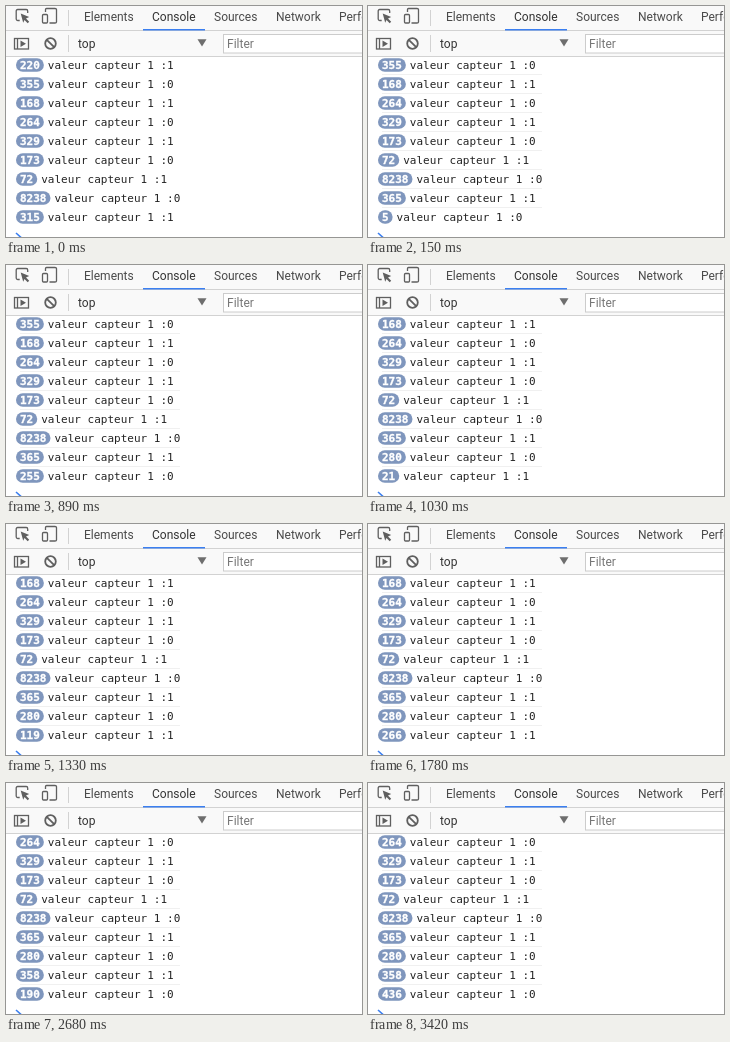
Animation, 356 px wide and 231 px high, one loop 3570 ms. Source, as an HTML page:

```html
<!DOCTYPE html>
<html lang="fr">
<head>
<meta charset="utf-8">
<title>Console</title>
<style>
  html, body { margin: 0; width: 100%; height: 100%; overflow: hidden; background: #fff; }
  svg { display: block; }
  text { white-space: pre; }
  .ui { font: 12px Roboto, sans-serif; fill: #4a4a4a; }
  .ui .active { fill: #333; }
  .ui .hint { fill: #777; }
  .log { font: 11px "DejaVu Sans Mono", monospace; fill: #222; }
  .count { font-weight: bold; fill: #fff; stroke: #fff; stroke-width: .35; }
  .icon { fill: none; stroke: #5f5f5f; stroke-width: 1.3; }
  .bold { stroke-width: 1.8; }
  .solid { fill: #5f5f5f; }
</style>
</head>
<body>
<svg width="356" height="231" viewBox="0 0 356 231">
  <rect width="356" height="50" fill="#f9f9f9"/>
  <path d="M0 24.5H356M0 50.5H356M62.5 4V20M62.5 29V46" stroke="#d2d2d2"/>

  <g transform="translate(.7 0)">
    <path class="icon" d="M13 14.5H11Q9.500 14.5 9.500 13V5Q9.500 3.500 11 3.500H19.500Q21 3.500 21 5V7"/>
    <path class="solid" d="M14 7.500L22.500 11L19.300 12.500L22.500 15.800L21 17.200L17.800 14L16.500 16.800Z"/>
  </g>
  <path class="icon" d="M39.500 6V3.500Q39.500 2.500 40.500 2.500H49Q50.500 2.500 50.500 3.500V16Q50.500 17 49 17H43.500"/>
  <rect class="icon" x="36.500" y="8.500" width="5" height="8.500" rx="1"/>

  <rect class="icon" x="8.500" y="32.500" width="14" height="10.500"/>
  <path class="icon" d="M11.500 32.500V43"/>
  <path class="solid" d="M14.500 34.500L20 37.700L14.500 41Z"/>
  <circle class="icon bold" cx="44.500" cy="37.500" r="5.300"/>
  <path class="icon bold" d="M40.800 33.800L48.200 41.200"/>
  <path d="M191.500 33.300H200.500L196 40.500Z" fill="#6e6e6e"/>
  <rect x="217.500" y="28.500" width="150" height="18.500" fill="#fff" stroke="#ccc"/>

  <g class="ui">
    <text x="78" y="15">Elements</text>
    <text class="active" x="146" y="15">Console</text>
    <text x="208" y="15">Sources</text>
    <text x="270" y="15">Network</text>
    <text x="333" y="15">Performance</text>
    <text class="active" x="72" y="42">top</text>
    <text class="hint" x="221" y="42">Filter</text>
  </g>
  <rect x="137" y="23" width="62" height="1.500" fill="#3b7ff0"/>

  <g id="rules" fill="#f0f0f0"></g>
  <g id="rows"></g>
  <path d="M10 227L14.500 231L10 235" fill="none" stroke="#3b7ff0" stroke-width="1.600"/>
</svg>
<script>
const LOOP = 3570, BEAT = 150, ROWS = 9, PITCH = 19, CHAR = 6.62;
const shortBeats = [1, 6, 18]; // these last 10 ms less
// Final repeat counts, oldest first; the sensor value alternates 1, 0.
const done = [220, 355, 168, 264, 329, 173, 72, 8238, 365, 280, 358];
// How the newest line counts up before the next one pushes it away.
const runs = [
  { from: 315, to: 315, beats: 1 },
  { from: 5, to: 255, beats: 6 },
  { from: 21, to: 315, beats: 7 },
  { from: 10, to: 436, beats: 10, ease: 1.062 }
];

const steps = runs.flatMap(({ from, to, beats, ease = 1 }, first) =>
  Array.from({ length: beats }, (_, n) => {
    const p = (n / Math.max(1, beats - 1)) ** ease;
    return { first, count: Math.round(from + (to - from) * p) };
  }));

const beatStart = k => k * BEAT - 10 * shortBeats.filter(b => b < k).length;

function add(parent, tag, attrs) {
  const el = document.createElementNS("http://www.w3.org/2000/svg", tag);
  for (const key in attrs) el.setAttribute(key, attrs[key]);
  return parent.appendChild(el);
}

const rules = document.getElementById("rules");
const rowLayer = document.getElementById("rows");
for (let i = 0; i < ROWS - 1; i++)
  add(rules, "rect", { x: 14, y: 68 + i * PITCH, width: 160, height: 1 });

const rows = Array.from({ length: ROWS }, (_, i) => {
  const y = 63 + i * PITCH;
  return {
    badge: add(rowLayer, "rect", { x: 10, y: y - 10.8, height: 13.6, rx: 6.8, fill: "#7f96bd" }),
    count: add(rowLayer, "text", { class: "log count", x: 14, y }),
    label: add(rowLayer, "text", { class: "log", y })
  };
});

function show({ first, count }) {
  rules.style.display = first ? "" : "none";
  rows.forEach((row, i) => {
    const line = first + i;
    const text = String(i === ROWS - 1 ? count : done[line]);
    const width = 8 + text.length * CHAR;
    row.badge.setAttribute("width", width);
    row.count.textContent = text;
    row.label.setAttribute("x", 14 + width);
    row.label.textContent = "valeur capteur 1 :" + (line % 2 ? 0 : 1);
  });
}

const start = performance.now();
let shown = -1;
function tick() {
  const t = (performance.now() - start) % LOOP;
  let k = steps.length - 1;
  while (beatStart(k) > t) k--;
  if (k !== shown) show(steps[shown = k]);
  requestAnimationFrame(tick);
}
tick();
</script>
</body>
</html>
```
